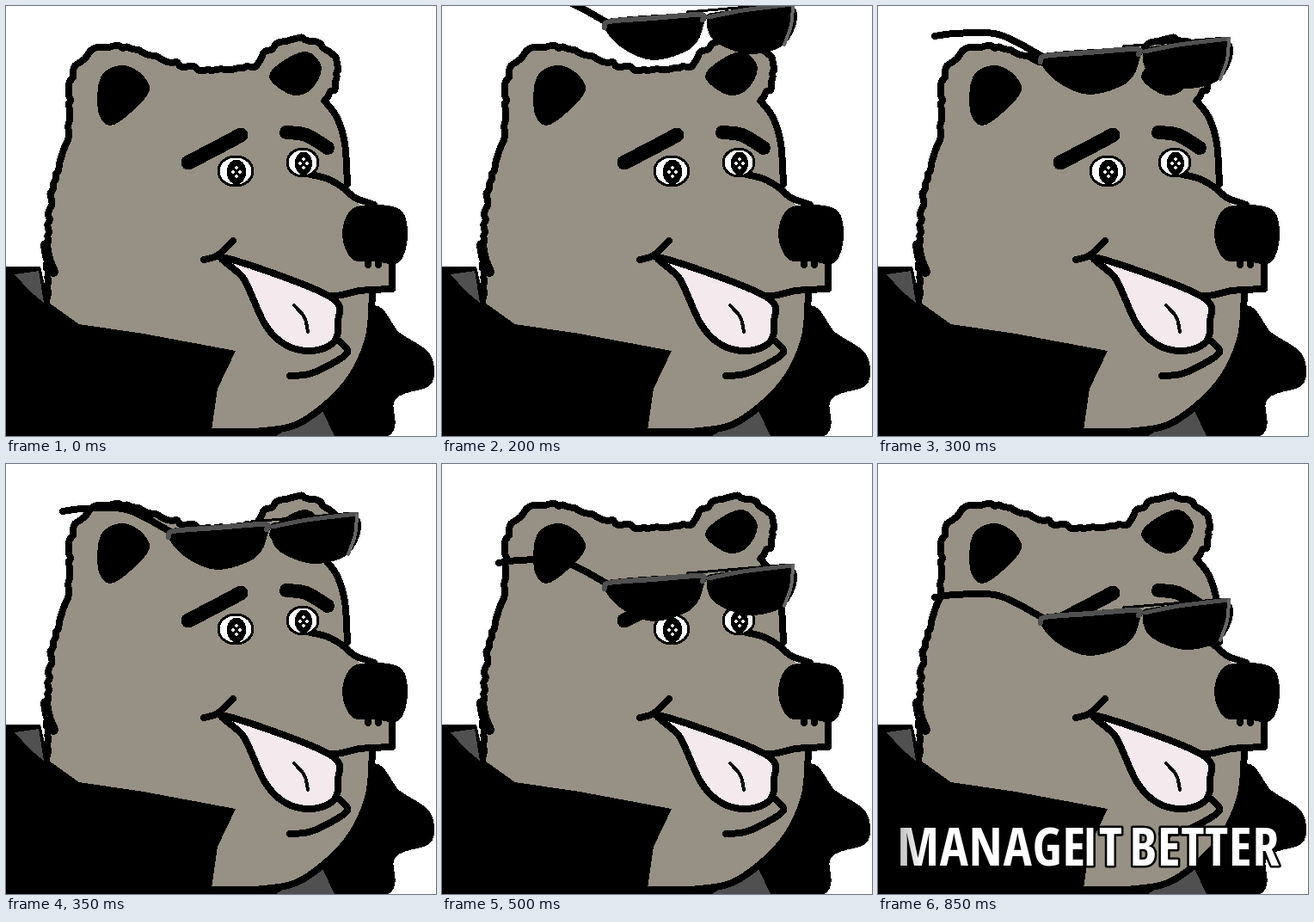
Recreate the animation shown at these times as an HTML page. Size 500 by 500 pixels, loop 1.85 s.

```html
<!DOCTYPE html>
<html lang="en">
<head>
<meta charset="utf-8">
<title>Cool bear</title>
<style>
  html, body { margin: 0; width: 100%; height: 100%; overflow: hidden; background: #fff; }
  svg { display: block; width: 100vw; height: 100vh; }
  path, ellipse, circle { shape-rendering: crispEdges; stroke-linecap: round; stroke-linejoin: round; }
  text {
    font: 800 62px 'Open Sans Condensed', 'Open Sans', 'Roboto Condensed', 'Liberation Sans', sans-serif;
    font-stretch: 75%;
    letter-spacing: 1px;
    text-anchor: middle;
    fill: #fff;
    stroke: #000;
    stroke-width: 5px;
    stroke-linejoin: round;
    paint-order: stroke;
  }
  text:first-child { fill: url(#sheen); }
</style>
</head>
<body>
<svg viewBox="0 0 500 500" xmlns="http://www.w3.org/2000/svg">
  <defs>
    <linearGradient id="sheen">
      <stop offset="0" stop-color="#bbb"/>
      <stop offset=".15" stop-color="#fff"/>
    </linearGradient>
  </defs>
  <g id="bear"></g>
  <g id="shades"></g>
  <g id="caption">
    <text x="132" y="467">MANAGE</text>
    <text x="261" y="467">IT</text>
    <text x="380" y="467">BETTER</text>
  </g>
</svg>
<script>
const NS = 'http://www.w3.org/2000/svg';
const LOOP = 1850, DROP_END = 600, CAPTION_AT = 850;
const STEPS = 12, STEP_PX = 20;
const FUR = '#979084', INK = '#000', GREY = '#505050', TONGUE = '#f4e9ed';
const bear = document.getElementById('bear');
const shades = document.getElementById('shades');
const caption = document.getElementById('caption');

let seed = 7;
const random = () => (seed = seed * 16807 % 2147483647) / 2147483647;

// Catmull-Rom curve through the points
function curve(s, closed) {
  const p = s.split(' ').map(q => q.split(',').map(Number)), n = p.length;
  const at = i => closed ? p[(i + n) % n] : p[Math.max(0, Math.min(n - 1, i))];
  let d = 'M' + p[0];
  for (let i = 0; i < (closed ? n : n - 1); i++) {
    const [a, b, c, e] = [at(i - 1), at(i), at(i + 1), at(i + 2)];
    const c1 = [0, 1].map(k => b[k] + (c[k] - a[k]) / 6);
    const c2 = [0, 1].map(k => c[k] - (e[k] - b[k]) / 6);
    d += `C${c1} ${c2} ${c}`;
  }
  return d + (closed ? 'Z' : '');
}

// Walks along a curve in small steps and jogs each one a little
function shaggy(s, step = 6, rough = 4) {
  const guide = document.createElementNS(NS, 'path');
  guide.setAttribute('d', curve(s));
  const jog = () => (random() - 0.5) * rough;
  const tufts = [];
  for (let at = 0; at < guide.getTotalLength(); at += step) {
    const { x, y } = guide.getPointAtLength(at);
    tufts.push(`${x + jog()},${y + jog()}`);
  }
  return tufts.join(' ');
}

function add(parent, tag, attrs) {
  const el = document.createElementNS(NS, tag);
  for (const k in attrs) el.setAttribute(k, attrs[k]);
  parent.append(el);
}
const path = (g, d, fill, stroke = 'none', width = 0) =>
  add(g, 'path', { d, fill, stroke, 'stroke-width': width });
const poly = (g, s, fill) => path(g, 'M' + s.replaceAll(' ', 'L') + 'Z', fill);
const blob = (g, s, fill = INK) => path(g, curve(s, true), fill);
const line = (g, s, width = 8, color = INK) => path(g, curve(s), 'none', color, width);

function drawBear() {
  const fur = shaggy('49,345 47,285 50,245 56,205 70,158 73,125 76,84 84,65 108,50 147,48 175,59 206,69 235,74 285,70 303,52 332,39 360,42 380,58 386,86 371,111');
  const cheek = '371,111 385,130 394,160 397,207';
  const snout = '350,195 374,201 390,210 406,223 428,231';
  const jaw = '426,332 421,388 395,440 345,483 300,494 240,495';
  const lip = '249,291 286,314 328,330 380,337 412,331 449,329';

  // Jacket behind the head
  blob(bear, '420,350 458,380 493,405 494,440 453,457 432,505 230,505 330,440');
  poly(bear, '355,474 368,471 382,500 314,500', GREY);

  // Head
  poly(bear, `${fur} ${cheek} 406,223 448,290 449,329 ${jaw} 50,400`, FUR);
  line(bear, fur);
  [cheek, jaw, snout, lip].forEach(s => line(bear, s));
  line(bear, '46,278 49,294 55,309', 12);

  // Jacket in front
  poly(bear, '0,303 40,303 50,345 85,370 160,381 267,401 246,445 238,500 0,500', INK);
  poly(bear, '10,312 38,308 44,345 28,332', GREY);

  // Ears and brows
  blob(bear, '110,83 132,69 155,77 167,98 145,124 121,139 107,122');
  blob(bear, '306,83 322,64 350,53 367,72 354,98 331,103');
  line(bear, '212,182 243,166 273,150', 17);
  line(bear, '326,147 349,150 374,165', 16);

  eye(267, 192, 20, 17);
  eye(345, 182, 18, 16);

  // Muzzle
  line(bear, '449,294 449,329');
  blob(bear, '391,266 401,237 430,231 460,238 467,268 457,298 428,297 402,294');
  for (const x of [421, 433]) line(bear, `${x},290 ${x},301`);

  // Mouth
  path(bear, curve('255,293 277,318 301,370 325,394 356,401 381,391 386,368 375,337', true), TONGUE, INK, 8);
  line(bear, '230,295 246,290 264,273');
  line(bear, '335,348 347,362 351,379', 4);
  line(bear, '388,390 397,403 375,418 352,428 330,430');
}

function eye(x, y, rx, ry) {
  add(bear, 'ellipse', { cx: x, cy: y, rx, ry, fill: '#fff', stroke: INK, 'stroke-width': 3 });
  add(bear, 'ellipse', { cx: x + 1, cy: y + 1, rx: rx * 0.56, ry: ry * 0.84, fill: INK });
  for (let i = 0; i < 4; i++) {
    const a = i * Math.PI / 2;
    add(bear, 'circle', { cx: x + 1 + 4 * Math.cos(a), cy: y + 1 + 5 * Math.sin(a), r: 1.8, fill: '#fff' });
  }
}

function drawShades() {
  line(shades, '66,155 90,152 140,153 190,178', 8);
  blob(shades, '188,183 200,174 298,169 304,182 290,209 245,223 207,207');
  blob(shades, '308,175 320,167 407,160 401,202 358,216 316,200');
  line(shades, '285,167 404,157', 3);
  line(shades, '189,185 195,178 245,174 300,170 303,176', 6, GREY);
  line(shades, '310,173 350,165 408,158', 5, GREY);
  line(shades, '408,159 406,182 398,205', 4, '#666');
}

drawBear();
drawShades();

const timing = { duration: LOOP, iterations: Infinity };
shades.animate([
  { transform: `translateY(${-STEPS * STEP_PX}px)`, easing: `steps(${STEPS}, end)` },
  { transform: 'translateY(0px)', offset: DROP_END / LOOP },
  { transform: 'translateY(0px)' }
], timing);
caption.animate([
  { opacity: 0, easing: 'steps(1, end)' },
  { opacity: 1, offset: CAPTION_AT / LOOP },
  { opacity: 1 }
], timing);
</script>
</body>
</html>
```
